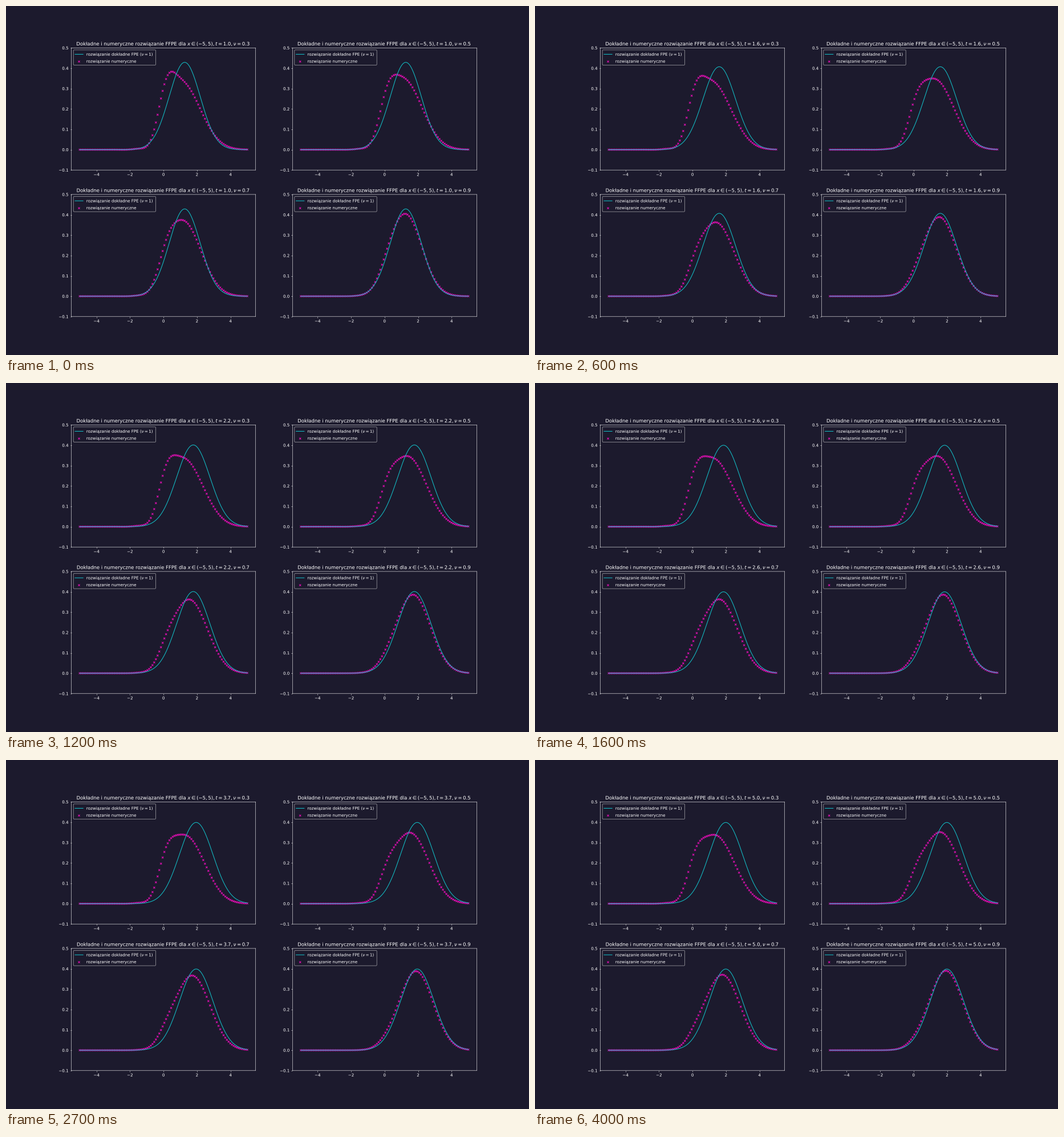
Animation of 917 by 611 pixels, one loop 4100 ms. Source, as a matplotlib script:

```python
import math

import matplotlib.pyplot as plt
import numpy as np
from matplotlib.animation import FuncAnimation
from matplotlib.patheffects import Normal
from matplotlib.text import Text

WIDTH, HEIGHT, DPI = 917, 611, 917 / 18
FRAMES, INTERVAL = 41, 100
BACK, CYAN, PINK = "#1c1a2d", "#13bcc4", "#d60fab"
ORDERS = (0.3, 0.5, 0.7, 0.9)
MEAN = 2.0                  # centre of the stationary state
MODES = 90                  # eigenmodes kept in the fractional solution
CUTOFF, SPREAD = 4.5, 1.1   # band limit and envelope of the starting pulse

plt.rcParams.update({
    "font.family": "DejaVu Sans",
    "text.hinting": "none",
    "figure.facecolor": BACK,
    "axes.facecolor": BACK,
    "axes.edgecolor": "white",
    "text.color": "white",
    "axes.labelcolor": "white",
    "xtick.color": "white",
    "ytick.color": "white",
})

x_line = np.linspace(-5, 5, 400)
x_marks = np.linspace(-5, 5, 100)


def exact(x, t):
    """Ornstein-Uhlenbeck density started from a point mass at zero."""
    mean = MEAN * (1 - math.exp(-t))
    var = 1 - math.exp(-2 * t)
    return np.exp(-(x - mean) ** 2 / (2 * var)) / math.sqrt(2 * math.pi * var)


def hermite(y):
    """Normalised Hermite polynomials He_m(y) / sqrt(m!), one row each."""
    rows = [np.ones_like(y), y]
    for m in range(1, MODES - 1):
        rows.append((y * rows[m] - math.sqrt(m) * rows[m - 1])
                    / math.sqrt(m + 1))
    return np.array(rows)


def pulse(x):
    """Smooth stand-in for the point mass at zero."""
    return (CUTOFF / math.pi * np.sinc(CUTOFF * x / math.pi)
            * np.exp(-x ** 2 / (2 * SPREAD ** 2)))


def relaxation(nu, t):
    """Mittag-Leffler decay E_nu(-m t^nu) of every mode m."""
    w = np.linspace(-100, 100, 2001)
    weight = math.sin(nu * math.pi) / math.pi / (
        2 * np.cosh(nu * w) + 2 * math.cos(nu * math.pi))
    rate = np.arange(MODES) ** (1 / nu) * t
    decay = np.exp(-rate[:, None] * np.exp(w)) @ weight * (w[1] - w[0])
    decay[0] = 1
    return decay


x_fine = np.linspace(-8, 8, 4001)
START = hermite(x_fine - MEAN) @ pulse(x_fine) * (x_fine[1] - x_fine[0])
BASIS = (hermite(x_marks - MEAN) * START[:, None]
         * np.exp(-(x_marks - MEAN) ** 2 / 2) / math.sqrt(2 * math.pi))


def numeric(nu, t):
    return relaxation(nu, t) @ BASIS


def title(nu, t):
    return ("Dokładne i numeryczne rozwiązanie FFPE dla "
            rf"$x \in (-5,5), t = {t:.1f}, \nu = {nu}$")


fig, axes = plt.subplots(2, 2, dpi=DPI,
                         figsize=((WIDTH + 0.01) / DPI, (HEIGHT + 0.01) / DPI))
panels = []
for ax, nu in zip(axes.flat, ORDERS):
    line, = ax.plot(x_line, exact(x_line, 1), color=CYAN, lw=1.5,
                    label=r"rozwiązanie dokładne FPE ($\nu = 1$)")
    # A colour per mark keeps the marks at sub-pixel positions.
    marks = ax.scatter(x_marks, numeric(nu, 1), s=20, marker="x",
                       c=[PINK] * len(x_marks),
                       label="rozwiązanie numeryczne")
    ax.set(xlim=(-5.5, 5.5), ylim=(-0.1, 0.5))
    ax.legend(loc="upper left")
    panels.append((ax, nu, line, marks))

# Smooth outlines instead of pixel-aligned glyphs and frames.
fig.canvas.draw()
for artist in fig.findobj():
    artist.set_snap(False)
for text in fig.findobj(Text):
    text.set_path_effects([Normal()])


def update(frame):
    t = 1 + frame / 10
    for ax, nu, line, marks in panels:
        line.set_ydata(exact(x_line, t))
        marks.set_offsets(np.column_stack([x_marks, numeric(nu, t)]))
        ax.set_title(title(nu, t))
    return []


anim = FuncAnimation(fig, update, frames=FRAMES, interval=INTERVAL,
                     repeat=True, repeat_delay=0)
plt.show()
```
